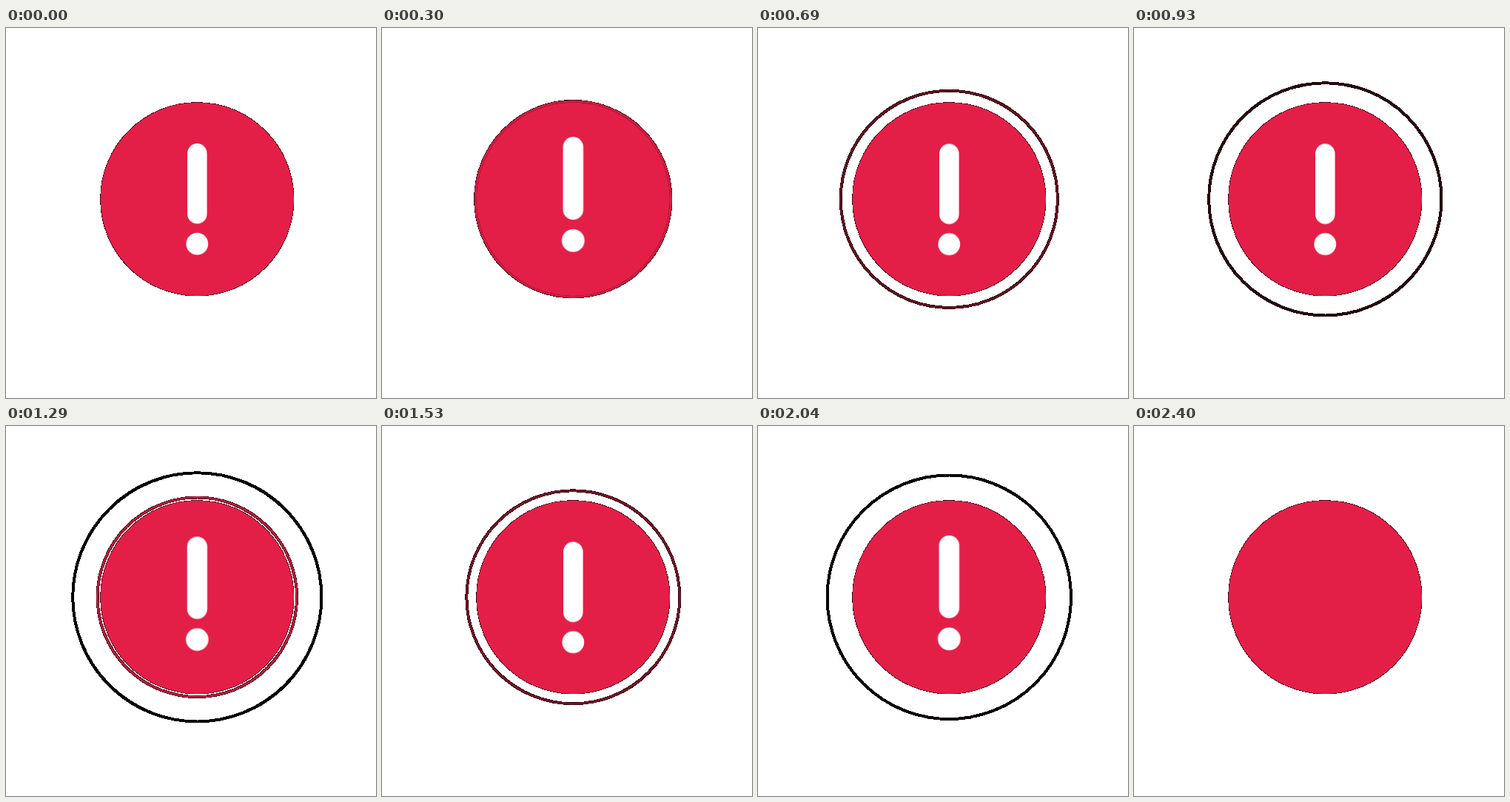
An HTML page that plays this animation: 500 px wide and 500 px high, repeating every 2430 ms.

```html
<!DOCTYPE html>
<html lang="en">
<head>
<meta charset="utf-8">
<title>Alert pulse</title>
<style>
  html, body { margin: 0; width: 100%; height: 100%; overflow: hidden; background: #fff; }
  svg { display: block; width: 100%; height: 100%; }

  .ring {
    fill: none;
    stroke-width: 3;
    animation: grow 2430ms infinite, darken 2430ms infinite, show 2430ms linear infinite;
  }
  .late { animation-delay: -1530ms; }

  .mark {
    fill: #fff;
    transform-origin: 258.3px 231.3px;
    animation: hop 2430ms cubic-bezier(.333, 0, .667, 1) infinite, cut 2430ms linear infinite;
  }

  /* each pulse runs from 90 ms to 1410 ms */
  @keyframes grow {
    0% { r: 129.5px; }
    3.704% { r: 129.5px; animation-timing-function: cubic-bezier(.333, 0, .667, 1); }
    58.025%, 100% { r: 169px; }
  }
  @keyframes darken {
    0% { stroke: #e31f48; }
    3.704% { stroke: #e31f48; animation-timing-function: cubic-bezier(.33, 0, .5, 1); }
    58.025%, 100% { stroke: #000; }
  }
  @keyframes show {
    0%, 3.704% { opacity: 0; }
    3.705%, 58.02% { opacity: 1; }
    58.021%, 100% { opacity: 0; }
  }

  /* three hops, 900 ms apart */
  @keyframes hop {
    0%, 34.57%, 37.037%, 71.6%, 74.074% { transform: none; }
    1.852%, 24.691%, 28.807%, 38.889%, 61.728%, 65.844%, 75.926%, 98.765%, 100% {
      transform: translateY(.5px);
    }
    11.728%, 48.765%, 85.802% { transform: translateY(-6.5px) scale(1.033); }
  }
  @keyframes cut {
    0%, 98.76% { opacity: 1; }
    98.761%, 100% { opacity: 0; }
  }
</style>
</head>
<body>
<svg viewBox="0 0 500 500">
  <!-- soft edges fall on black, with a hard outer cut -->
  <filter id="matte" filterUnits="userSpaceOnUse" x="0" y="0" width="500" height="500"
          color-interpolation-filters="sRGB">
    <feColorMatrix values="0 0 0 0 0  0 0 0 0 0  0 0 0 0 0  0 0 0 255 0" result="black"/>
    <feMerge>
      <feMergeNode in="black"/>
      <feMergeNode in="SourceGraphic"/>
    </feMerge>
  </filter>
  <g filter="url(#matte)">
    <circle class="ring" cx="258.3" cy="231.3" r="129.5"/>
    <circle class="ring late" cx="258.3" cy="231.3" r="129.5"/>
    <circle cx="258.3" cy="231.3" r="130.7" fill="#e31f48"/>
  </g>
  <g class="mark">
    <rect x="245" y="156.1" width="26.6" height="108.4" rx="13.3"/>
    <circle cx="258.3" cy="291.7" r="14.9"/>
  </g>
</svg>
</body>
</html>
```
